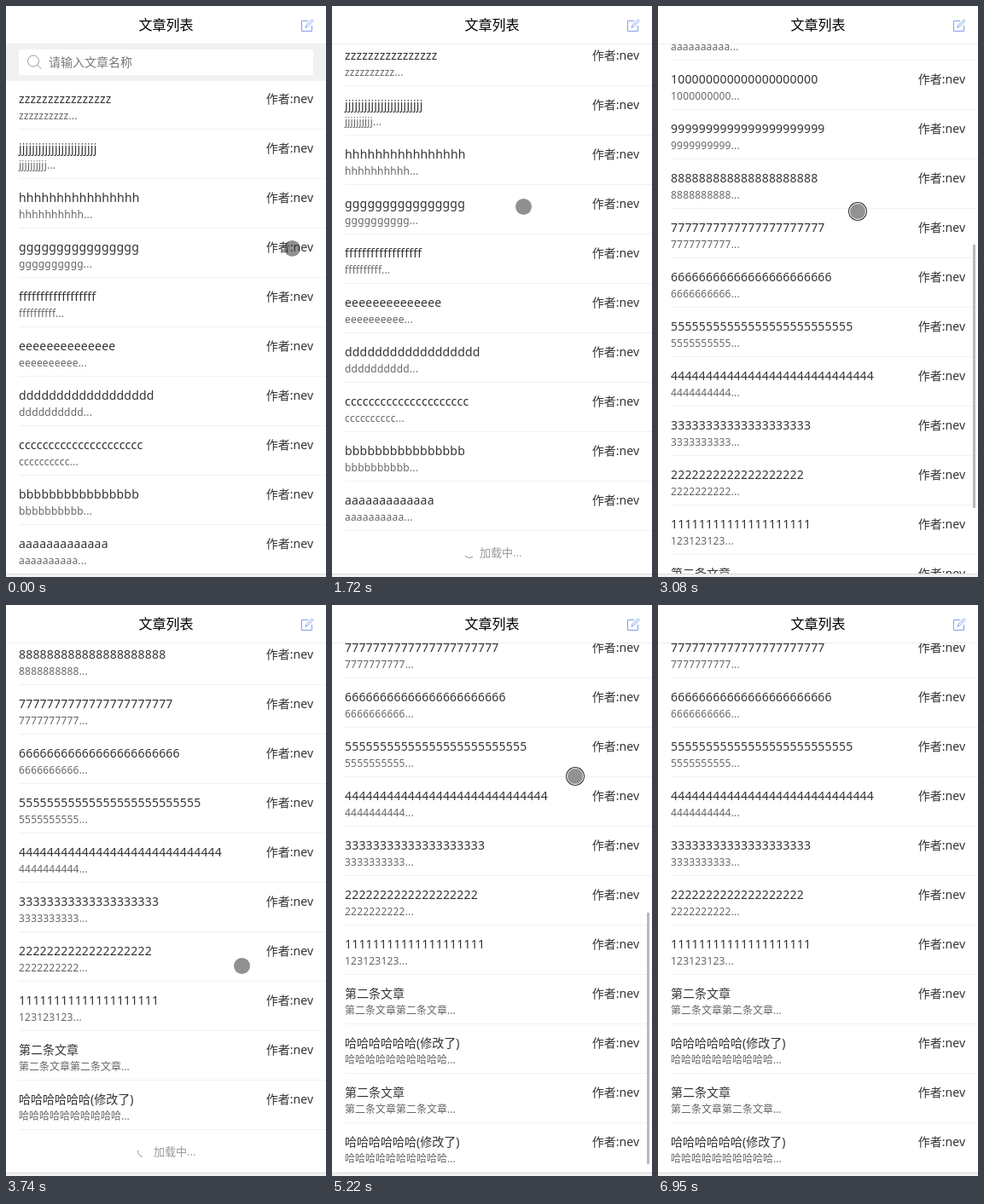
An HTML page that plays this animation: 375x670 px, repeating every 7100 ms.

```html
<!DOCTYPE html>
<html lang="zh-CN">
<head>
<meta charset="utf-8">
<style>
html, body { margin: 0; width: 100%; height: 100%; overflow: hidden; background: #fff; }
body { position: relative; font: 14px/20px "Noto Sans", "Noto Sans CJK SC", "Noto Sans CJK JP", sans-serif; color: #333; }
body * { position: absolute; box-sizing: border-box; white-space: nowrap; }
#stage { left: 0; top: 0; width: 375px; height: 670px; overflow: hidden; }
#list { left: 0; top: 0; width: 375px; }
#search { top: 44px; width: 375px; height: 44px; background: #f1f1f1; }
#search div { left: 15px; top: 7px; width: 345px; height: 30px; border-radius: 3px; background: #fff; }
#search span { left: 35px; top: 5px; color: #777; }
#search svg { left: 9px; top: 6px; }
.row { left: 15px; width: 360px; height: 58px; border-bottom: 1px solid #f1f1f1; }
.row b { top: 12px; font-weight: 400; }
.row i { top: 33px; font-style: normal; font-size: 12px; line-height: 18px; color: #666; }
.row u { top: 12px; right: 15px; text-decoration: none; }
.latin { letter-spacing: .2px; }
#load { width: 375px; height: 50px; font-size: 13px; color: #999; }
#load span { left: 173px; top: 15px; }
#spin { left: 154px; top: 18px; width: 14px; height: 14px; border: 1px solid transparent; border-top-color: #999; border-radius: 50%; }
#head { width: 375px; height: 45px; background: #fff; border-bottom: 1px solid #eee; }
#head span { width: 375px; top: 12px; text-align: center; font-size: 16px; color: #000; }
#head svg { left: 345px; top: 15px; }
#foot { top: 666px; width: 375px; height: 4px; background: #f1f1f1; border-top: 1px solid #ddd; }
#bar { left: 369px; width: 3px; background: #b9b9b9; }
#touch { width: 19px; height: 19px; margin: -9.5px; border-radius: 50%; background: rgba(60, 60, 60, .57); }
#touch.down { width: 20px; height: 20px; border: 1.5px solid #fff; background: #929292; box-shadow: 0 0 0 1px #333; }
</style>
</head>
<body>
<div id="stage">
  <div id="list">
    <div id="search"><div>
      <svg width="20" height="20" fill="none" stroke="#999"><circle cx="8" cy="7.5" r="6.5"/><path d="M12.5 12l5 5"/></svg>
      <span>请输入文章名称</span>
    </div></div>
    <div id="load"><div id="spin"></div><span>加载中...</span></div>
  </div>
  <div id="head"><span>文章列表</span>
    <svg width="16" height="16" fill="none" stroke="#7f9ff0"><path d="M9 2.5H1.5v12h12V8M6 10.5l1-3L13.5 1l1.5 1.5L8.5 9z"/></svg>
  </div>
  <div id="foot"></div>
  <div id="bar"></div>
  <div id="touch"></div>
</div>
<script>
const LOOP = 7100, ROW = 58, TOP = 87, VIEW = 666, TRACK = 657, LOADER = 50;
const $ = id => document.getElementById(id);

// One character and its repeat count per article
const latin = "z16 j24 h16 g16 f18 e14 d18 c21 b16 a13 020 922 821 722 623 526 429 320 219 120"
  .split(" ").map(s => [s[0].repeat(s.slice(1)), s[0].repeat(10) + "..."]);
latin[10] = ["1" + latin[10][0], "1000000000..."];
latin[19][1] = "123123123...";
const chinese = [["第二条文章", "第二条文章第二条文章..."], ["哈哈哈哈哈哈(修改了)", "哈".repeat(10) + "..."]];

const rows = [...latin, ...chinese, ...chinese].map(([title, sub], i) => {
  const row = document.createElement("div");
  const cls = /^\w/.test(title) ? "latin" : "";
  row.className = "row";
  row.style.top = TOP + ROW * i + "px";
  row.innerHTML = `<b class="${cls}">${title}</b><i class="${cls}">${sub}</i><u>作者:nev</u>`;
  $("list").append(row);
  return row;
});

// Arrival of each page, its rows in all, and when the next one is requested
const pages = [
  { at: 0, rows: 10, ask: 0 },
  { at: 2260, rows: 22, ask: 2665 },
  { at: 4820, rows: 24, ask: Infinity }
];
// Pointer moves; those with a page are drags that scroll to its end
const moves = [
  { at: 150, ms: 400, x: 231, y: 416 },
  { at: 575, ms: 430, x: 224, y: 235, page: pages[0] },
  { at: 1850, ms: 400, x: 225, y: 550 },
  { at: 2450, ms: 800, x: 235, y: 200, page: pages[1] },
  { at: 3250, ms: 450, x: 276, y: 423 },
  { at: 5060, ms: 225, x: 286, y: 146, page: pages[2] },
  { at: 6450, ms: 500, x: 390, y: 690 }
];

const clamp = v => Math.max(0, Math.min(1, v));
const ease = p => p * p * (3 - 2 * p);
const swipe = d => d + d ** 3 / 350 ** 2; // long drags gain momentum
const endOf = page => TOP + ROW * page.rows;
const limit = page => endOf(page) + (page.ask < LOOP ? LOADER : 0) - VIEW;

function pose(t) {
  let x = 335, y = 284, scroll = 0, down = false, bar = 0;
  for (const m of moves) {
    const p = ease(clamp((t - m.at) / m.ms));
    const since = t - m.at - m.ms;
    if (m.page && t >= m.at) {
      scroll = Math.min(limit(m.page), scroll + swipe((y - m.y) * p));
      down = since < 0;
      bar = clamp(1 - (since - 200) / 250);
    }
    x += (m.x - x) * p;
    y += (m.y - y) * p;
  }
  return { x, y, scroll: Math.round(scroll), down, bar };
}

function draw() {
  const t = performance.now() % LOOP;
  const { x, y, scroll, down, bar } = pose(t);
  const page = pages.findLast(p => t >= p.at);
  const loading = t >= page.ask;
  const end = endOf(page);
  const scale = TRACK / (end + (loading ? LOADER : 0));

  $("list").style.top = -scroll + "px";
  rows.forEach((row, i) => row.hidden = i >= page.rows);
  $("load").hidden = !loading;
  $("load").style.top = end + "px";
  $("spin").style.transform = `rotate(${79 + (loading ? (t - page.ask) * .48 : 0)}deg)`;
  Object.assign($("bar").style, {
    top: Math.round(scroll * scale) + "px",
    height: Math.floor(VIEW * scale) + "px",
    opacity: bar
  });
  $("touch").className = down ? "down" : "";
  Object.assign($("touch").style, { left: x + "px", top: y + "px" });
  requestAnimationFrame(draw);
}
draw();
</script>
</body>
</html>
```
